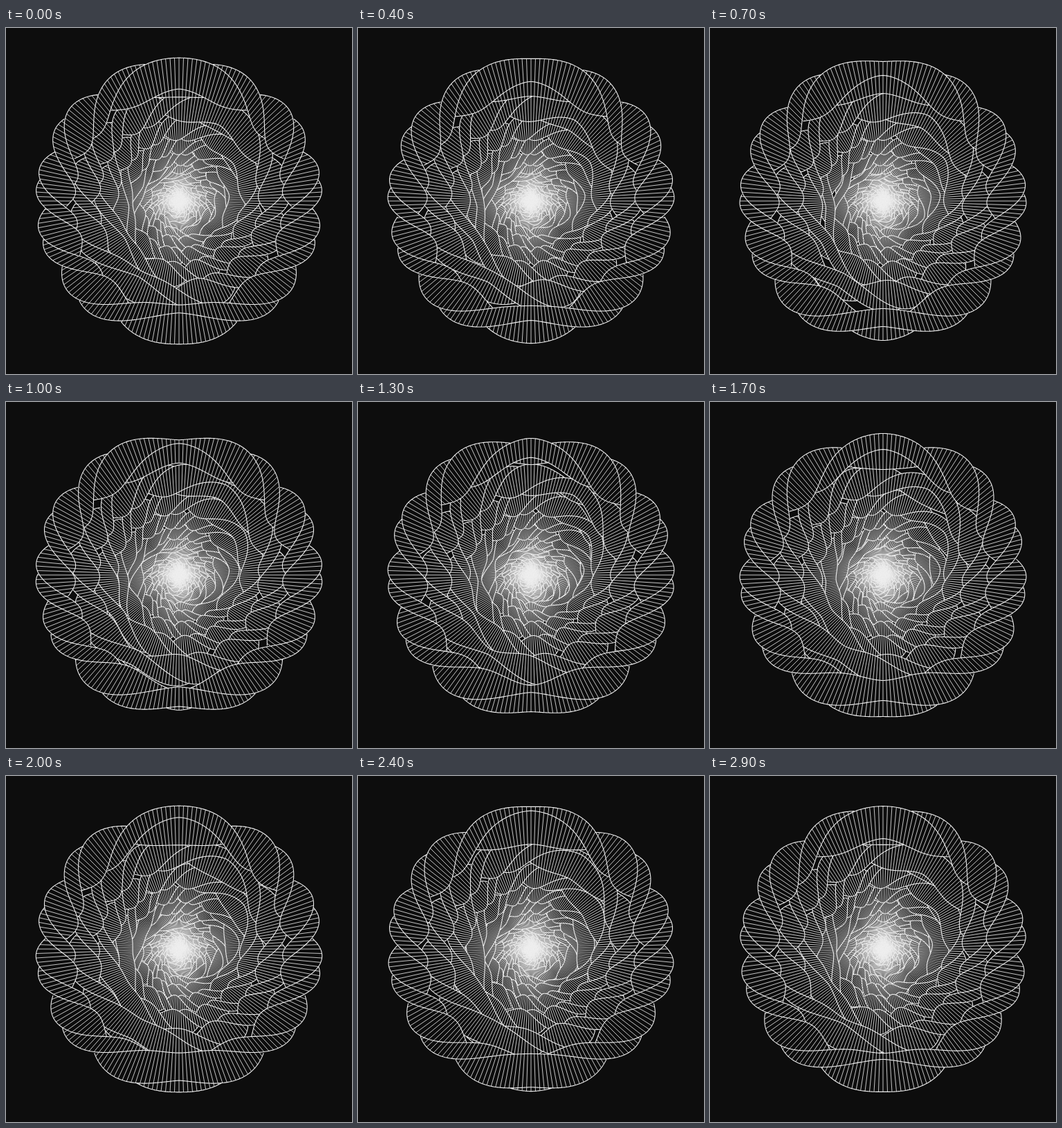
An HTML page with a canvas that plays this animation: 500 px wide and 500 px high, repeating every 3 s.

```html
<!DOCTYPE html>
<html lang="en">
<head>
<meta charset="utf-8">
<title>Twisted rings</title>
<style>
  html, body { margin: 0; width: 100%; height: 100%; overflow: hidden; background: #0d0d0d; }
  canvas { display: block; width: 500px; height: 500px; }
</style>
</head>
<body>
<canvas id="stage" width="500" height="500"></canvas>
<script>
const ctx = document.getElementById('stage').getContext('2d');
const BG = '#0d0d0d';
const TAU = Math.PI * 2, DEG = Math.PI / 180;
const LOOP = 3000, STEP = 100;

// Nested rings, each a bar with a rectangular section that twists along its length.
const RINGS = 20, TURN = 28 * DEG;
const RADIUS = 178.5, RADIUS_RATIO = 0.77;
const HALF = 28.5, HALF_RATIO = 0.8;
const HATCHES = 200, SAMPLES = 800;
const TWIST = 5 * Math.PI, EASE = 1.55;
const CORNERS = [0, 60, 180, 240].map(d => d * DEG);

function ease(p) {
  return p < 0.5
    ? 0.5 * Math.pow(2 * p, EASE)
    : 1 - 0.5 * Math.pow(2 - 2 * p, EASE);
}

// Section angle at a clockwise angle a from the ring's own top.
function twist(a, phase) {
  const w = ((a % TAU) + TAU) % TAU;
  return phase - TWIST * ease(Math.min(w, TAU - w) / Math.PI);
}

const faces = angle => Math.sin(angle) < 0;

// A corner shows when one of its two faces points to the viewer.
function visible(j, tw) {
  const c = CORNERS[j];
  const next = CORNERS[(j + 1) % 4] + (j === 3 ? TAU : 0);
  const prev = CORNERS[(j + 3) % 4] - (j === 0 ? TAU : 0);
  return faces(tw + (c + next) / 2) || faces(tw + (c + prev) / 2);
}

const at = (t, r) => [250 + Math.sin(t) * r, 250 - Math.cos(t) * r];

function drawRing(n, phase) {
  const radius = RADIUS * Math.pow(RADIUS_RATIO, n);
  const half = HALF * Math.pow(HALF_RATIO, n);

  const cuts = [];
  for (let i = 0; i < SAMPLES; i++) {
    const t = i / SAMPLES * TAU;
    const tw = twist(t - n * TURN, phase);
    const radii = CORNERS.map(c => radius + half * Math.cos(tw + c));
    cuts.push({ t, tw, radii, min: Math.min(...radii), max: Math.max(...radii) });
  }

  ctx.beginPath();
  for (const side of ['max', 'min']) {
    cuts.forEach((c, i) => {
      const p = at(c.t, c[side]);
      i ? ctx.lineTo(...p) : ctx.moveTo(...p);
    });
    ctx.closePath();
  }
  ctx.fillStyle = BG;
  ctx.fill('evenodd');

  ctx.beginPath();
  for (let i = 0; i < SAMPLES; i += SAMPLES / HATCHES) {
    const c = cuts[i];
    ctx.moveTo(...at(c.t, c.min));
    ctx.lineTo(...at(c.t, c.max));
  }
  ctx.lineWidth = 0.95;
  ctx.strokeStyle = 'rgba(238,238,238,0.86)';
  ctx.stroke();

  ctx.beginPath();
  for (let j = 0; j < 4; j++) {
    let open = false;
    for (let i = 0; i <= SAMPLES; i++) {
      const c = cuts[i % SAMPLES];
      const p = at(c.t, c.radii[j]);
      const show = visible(j, c.tw);
      if (show) open ? ctx.lineTo(...p) : ctx.moveTo(...p);
      open = show;
    }
  }
  ctx.lineWidth = 1.1;
  ctx.strokeStyle = '#eeeeee';
  ctx.stroke();
}

function draw(step) {
  const phase = Math.PI * (step * STEP / LOOP - 1 / 30);
  ctx.fillStyle = BG;
  ctx.fillRect(0, 0, 500, 500);
  ctx.lineJoin = 'round';
  for (let n = RINGS - 1; n >= 0; n--) drawRing(n, phase);
}

let shown = -1;
const start = performance.now();

function tick() {
  const step = Math.floor((performance.now() - start) % LOOP / STEP);
  if (step !== shown) draw(shown = step);
  requestAnimationFrame(tick);
}
tick();
</script>
</body>
</html>
```
